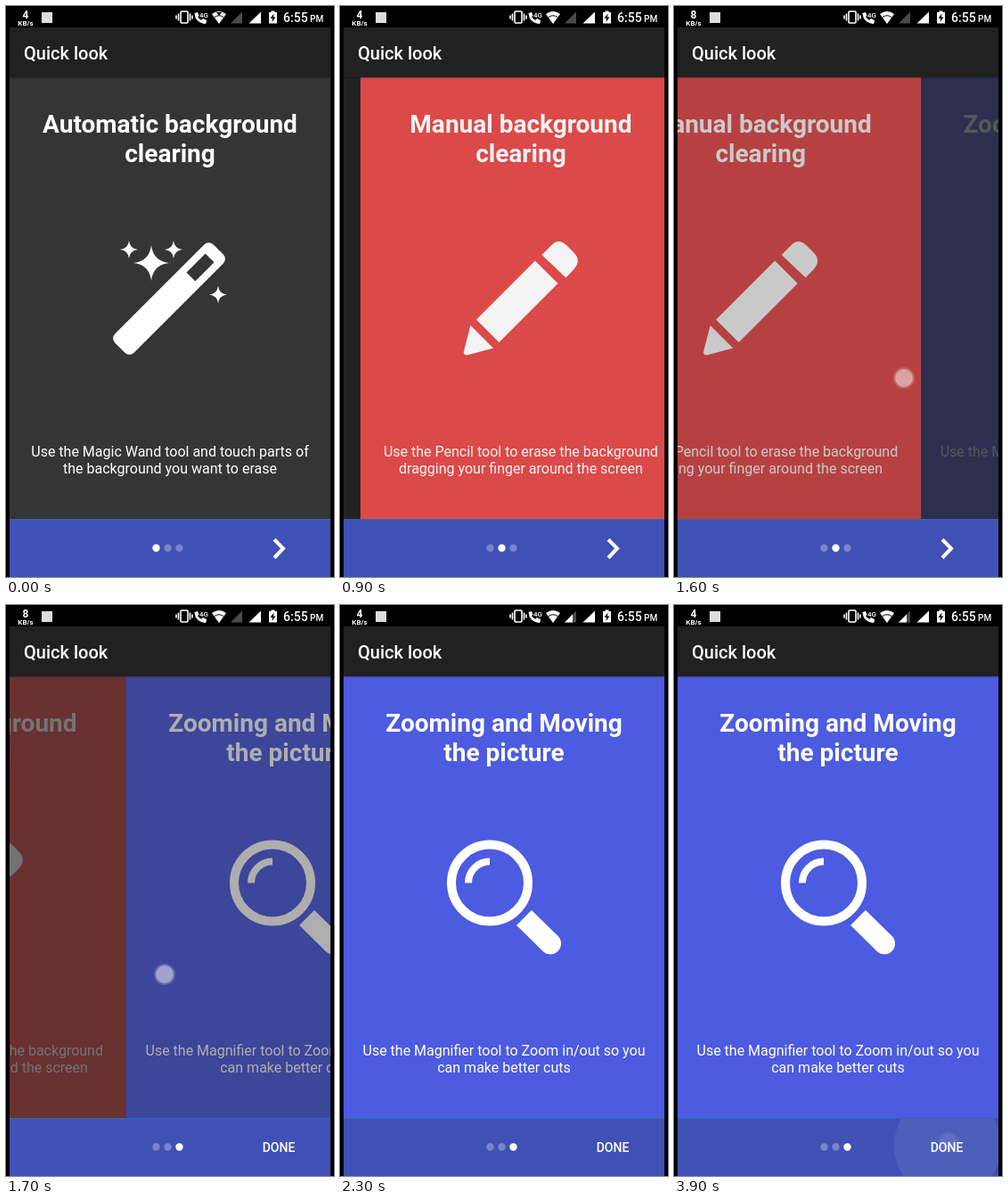
Animation of 368x640 px, one loop 4000 ms. Source, as an HTML page:

```html
<!DOCTYPE html>
<html lang="en">
<head>
<meta charset="utf-8">
<title>Quick look</title>
<style>
  html, body { margin: 0; width: 100%; height: 100%; overflow: hidden; background: #000; }
  svg { display: block; width: 100%; height: 100%; font-family: Roboto, sans-serif; fill: #fff; }
  .mid { text-anchor: middle; }
  .title { font-size: 28px; font-weight: 700; }
  .body { font-size: 16px; }
  .medium { font-weight: 500; }
  .line { fill: none; stroke: #fff; }
</style>
</head>
<body>
<svg viewBox="0 0 368 640" xmlns="http://www.w3.org/2000/svg">
  <defs>
    <clipPath id="pagerClip"><rect x="4" y="80" width="360" height="496"/></clipPath>
    <clipPath id="barClip"><rect x="4" y="576" width="360" height="64"/></clipPath>
    <path id="star" d="M0-1Q.1-.1 1 0Q.1 .1 0 1Q-.1 .1-1 0Q-.1-.1 0-1Z"/>
  </defs>
  <rect width="368" height="640" fill="#000"/>

  <!-- status bar -->
  <text id="speed" class="mid" x="22" y="13.5" font-size="12" font-weight="700">4</text>
  <text class="mid" x="22" y="21.5" font-size="8" font-weight="700">KB/s</text>
  <rect x="40" y="7" width="12" height="12" fill="#ddd"/>
  <g class="line" stroke-width="1.6">
    <rect x="196" y="6" width="8" height="13" rx="1"/>
    <path d="M193.5 8.5v8M206.500 8.500v8M191 10.500v4M209 10.500v4"/>
  </g>
  <path class="line" stroke-width="2.600" d="M213 8Q213 17 224 19"/>
  <path d="M211.500 8l3.500-1 1.500 4-3 2zM219 16l2-2 4 2-.5 3.500z"/>
  <text x="217" y="12.500" font-size="8" class="medium">4G</text>
  <path d="M231 9Q239 3 247 9L239 20Z"/>
  <path class="line" style="stroke:#000" stroke-width="1" d="M234 12.500Q239 9 244 12.500"/>
  <path id="wifiMark" fill="#000" d="M236 7h6l-3 4z"/>
  <path fill="#4a4a4a" d="M252 19.500L265 6.500V19.500Z"/>
  <path id="signal" d="M252 19.500L261 10.500V19.500Z"/>
  <path d="M272.500 19.500L286 6.500V19.500Z"/>
  <path d="M295 7h2.500V5.500h4V7H304V19.500H295Z"/>
  <path fill="#000" d="M300.500 8.500L296.500 13.800H299L298.500 18L302.500 12.500H300Z"/>
  <text x="311" y="18" font-size="14" class="medium">6:55</text>
  <text x="341" y="18" font-size="10" class="medium">PM</text>

  <!-- toolbar and pager -->
  <rect x="4" y="24" width="360" height="56" fill="#212121"/>
  <text x="20" y="60" font-size="20" class="medium">Quick look</text>
  <rect x="4" y="80" width="360" height="496" fill="#222"/>
  <g clip-path="url(#pagerClip)">
    <g class="page">
      <rect x="4" y="80" width="360" height="496" fill="#353535"/>
      <g transform="translate(183 328) rotate(-45)">
        <rect x="-78" y="-15" width="156" height="30" rx="7"/>
        <rect x="34.500" y="-7" width="30" height="14" fill="#353535"/>
      </g>
      <use href="#star" transform="translate(163 288) scale(20)"/>
      <use href="#star" transform="translate(138 273) scale(10)"/>
      <use href="#star" transform="translate(188 273) scale(10)"/>
      <use href="#star" transform="translate(238 323.500) scale(10)"/>
    </g>
    <g class="page">
      <rect x="4" y="80" width="360" height="496" fill="#e64c4c"/>
      <path d="M207.500 279L218 268.500Q226 260 235 268L243.500 276.500Q252 285 244 294.500L234.500 304.500Z"/>
      <path d="M200 285.500L225.500 311L159.500 377L134 351.500Z"/>
      <path d="M127.500 358L153 383.500L125 391Q119 392 120 387Z"/>
    </g>
    <g class="page">
      <rect x="4" y="80" width="360" height="496" fill="#4c5be0"/>
      <circle class="line" cx="168" cy="311.500" r="43" stroke-width="10"/>
      <path class="line" stroke-width="8" d="M144 311.500A24 24 0 0 1 168 287.500"/>
      <path class="line" stroke-width="24" d="M206.500 350.500L236 379.500"/>
      <circle cx="236" cy="379.500" r="12"/>
    </g>
  </g>
  <rect x="4" y="80" width="360" height="1.500" fill="#000" opacity=".18"/>

  <!-- bottom bar -->
  <rect x="4" y="576" width="360" height="64" fill="#3f51b5"/>
  <rect x="4" y="575" width="360" height="1.200" fill="#2d68b4"/>
  <circle id="ripple" cx="307" cy="606" clip-path="url(#barClip)" opacity=".08"/>
  <circle class="dot" cx="168.500" cy="607.500" r="4.200"/>
  <circle class="dot" cx="181.500" cy="607.500" r="4.200"/>
  <circle class="dot" cx="194.500" cy="607.500" r="4.200"/>
  <path id="next" class="line" stroke-width="4" d="M301 598L311 608L301 618.500"/>
  <text id="done" class="mid medium" x="306" y="613" font-size="14">DONE</text>

  <g id="touch">
    <circle r="12" opacity=".18"/>
    <circle r="10" opacity=".4"/>
  </g>
</svg>
<script>
const LOOP = 4000, STEP = 100, WIDTH = 360, DRAG = 200;
const $ = id => document.getElementById(id);
const pages = [...document.querySelectorAll('.page')];
const dots = [...document.querySelectorAll('.dot')];

const copy = [
  ['Automatic background', 'clearing',
   'Use the Magic Wand tool and touch parts of', 'the background you want to erase'],
  ['Manual background', 'clearing',
   'Use the Pencil tool to erase the background', 'dragging your finger around the screen'],
  ['Zooming and Moving', 'the picture',
   'Use the Magnifier tool to Zoom in/out so you', 'can make better cuts']
];
const baselines = [142, 175, 505, 524];

copy.forEach((lines, p) => lines.forEach((line, i) => {
  const text = document.createElementNS('http://www.w3.org/2000/svg', 'text');
  text.setAttribute('class', 'mid ' + (i < 2 ? 'title' : 'body'));
  text.setAttribute('x', 184);
  text.setAttribute('y', baselines[i]);
  text.textContent = line;
  pages[p].append(text);
}));

// drag: share of the width covered by the finger; settle: length of the fling
const swipes = [
  { start: 500, drag: 199 / WIDTH, settle: 574, x: 174, y: 428.5 },
  { start: 1500, drag: 229 / WIDTH, settle: 525, x: 178, y: 414 }
];

function progress(swipe, t) {
  const u = t - swipe.start;
  if (u < 0) return 0;
  if (u < DRAG) return swipe.drag * ((u + 40) / (DRAG + 40)) ** 1.8;
  const left = Math.max(0, 1 - (u - DRAG) / swipe.settle);
  return 1 - (1 - swipe.drag) * left ** 5;
}

function touchAt(t) {
  for (const s of swipes) {
    const left = s.start + DRAG - t;
    if (left >= 0 && left <= DRAG) return { x: s.x + left * .8, y: s.y + left * .03, alpha: 1 };
  }
  if (t >= 3600) return { x: 307.5, y: 602, alpha: t < 3900 ? .8 : .2 };
  return { x: 0, y: 0, alpha: 0 };
}

const show = (el, on) => el.setAttribute('visibility', on ? 'visible' : 'hidden');

function draw(t) {
  const pos = swipes.reduce((sum, s) => sum + progress(s, t), 0);
  const current = Math.round(pos);

  pages.forEach((page, i) => {
    const away = i - pos;
    page.setAttribute('transform', `translate(${away * WIDTH} 0)`);
    page.setAttribute('opacity', Math.max(0, 1 - Math.abs(away)));
    show(page, Math.abs(away) < 1);
  });
  dots.forEach((dot, i) => dot.setAttribute('opacity', i === current ? 1 : .3));
  show($('next'), current < 2);
  show($('done'), current === 2);

  const touch = touchAt(t);
  $('touch').setAttribute('transform', `translate(${touch.x} ${touch.y})`);
  $('touch').setAttribute('opacity', touch.alpha);
  $('ripple').setAttribute('r', Math.max(0, (t - 3600) * .2));

  $('speed').textContent = t >= 1100 && t < 2200 ? 8 : 4;
  show($('wifiMark'), t < 100);
  show($('signal'), t >= 2200);
}

const began = performance.now();
function tick() {
  const t = (performance.now() - began) % LOOP;
  draw(Math.floor(t / STEP) * STEP);
  requestAnimationFrame(tick);
}
draw(0);
requestAnimationFrame(tick);
</script>
</body>
</html>
```
